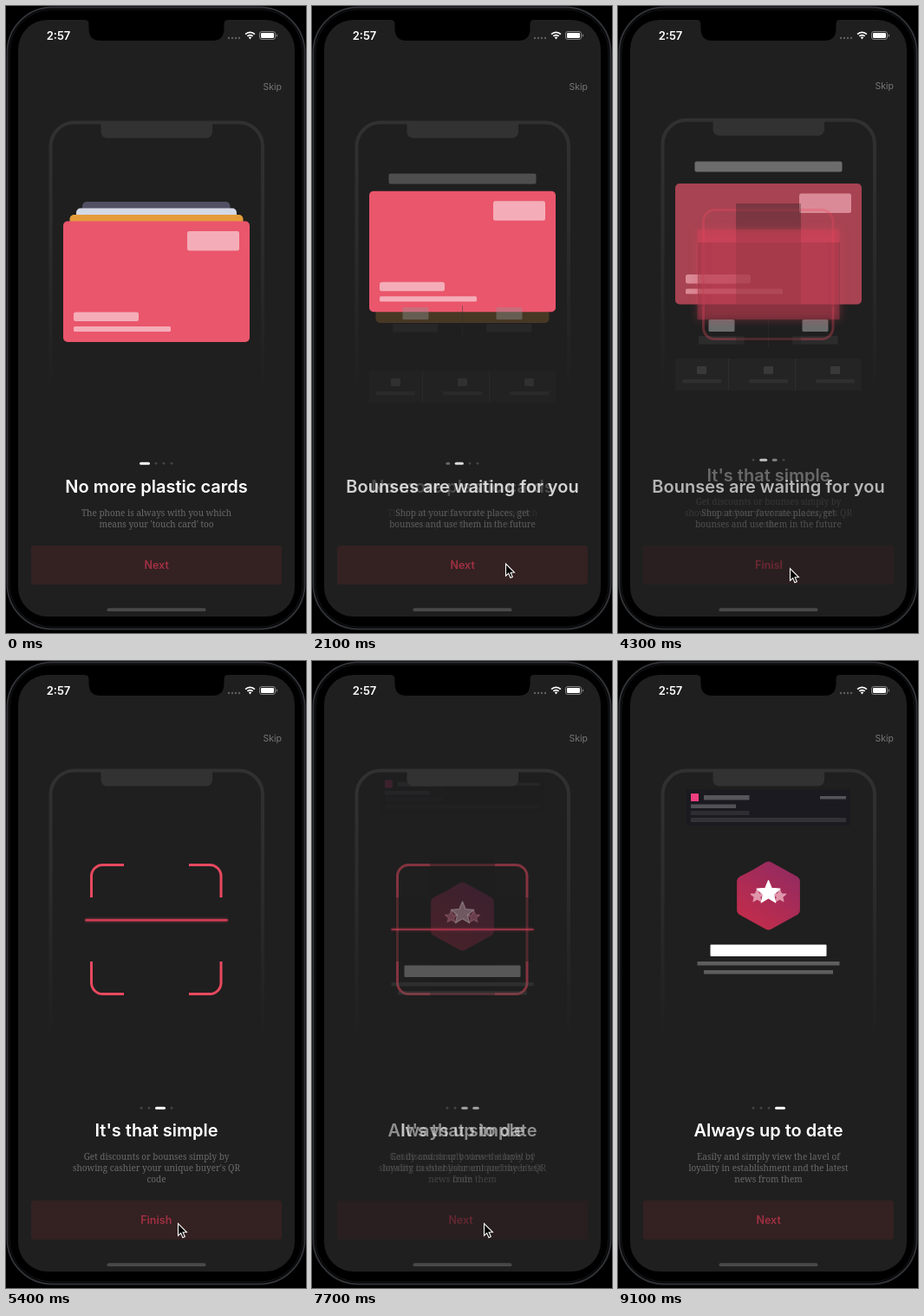
An HTML page with a canvas that plays this animation: 346 by 724 pixels, repeating every 10000 ms.

```html
<!DOCTYPE html>
<html lang="en">
<head>
<meta charset="utf-8">
<title>Onboarding</title>
<style>
html, body { margin: 0; width: 100%; height: 100%; overflow: hidden; background: #000; }
canvas { display: block; width: 346px; height: 724px; }
</style>
</head>
<body>
<canvas id="stage"></canvas>
<script>
const W = 346, H = 724, LOOP = 10000, STEP = 100, MID = 173.5;
const BG = '#1f1f1f', RED = '#ea566c', LINE = '#e8495f';
const SANS = 'Inter, "Open Sans", sans-serif';
const SERIF = '"Noto Serif", "Liberation Serif", serif';

const PAGES = [
  { title: 'No more plastic cards', y: 554.5, text: ['The phone is always with you which', "means your 'touch card' too"] },
  { title: 'Bounses are waiting for you', y: 554.5, text: ['Shop at your favorate places, get', 'bounses and use them in the future'] },
  { title: "It's that simple", y: 542, text: ['Get discounts or bounses simply by', "showing cashier your unique buyer's QR", 'code'] },
  { title: 'Always up to date', y: 542, text: ['Easily and simply view the lavel of', 'loyality in establishment and the latest', 'news from them'] }
];

const cv = document.getElementById('stage');
const dpr = window.devicePixelRatio || 1;
cv.width = W * dpr;
cv.height = H * dpr;
const c = cv.getContext('2d');

const clamp = (v, a = 0, b = 1) => Math.min(b, Math.max(a, v));
const mix = (a, b, k) => a + (b - a) * k;
const easeOut = u => 1 - (1 - u) ** 3;
const swing = u => (1 - Math.cos(Math.PI * u)) / 2;
const span = (t, a, b) => clamp((t - a) / (b - a));

function track(t, keys, ease = u => u) {
  if (t <= keys[0][0]) return keys[0][1];
  for (let i = 1; i < keys.length; i++) {
    const [t0, v0] = keys[i - 1], [t1, v1] = keys[i];
    if (t < t1) return mix(v0, v1, ease((t - t0) / (t1 - t0)));
  }
  return keys[keys.length - 1][1];
}

// Draws inside a saved state with opacity and offset.
function layer(alpha, dy, draw) {
  if (alpha <= 0.003) return;
  c.save();
  c.globalAlpha *= alpha;
  c.translate(0, dy);
  draw();
  c.restore();
}

// Box given by its edges.
function box(x0, y0, x1, y1, fill, r = 0) {
  c.beginPath();
  c.roundRect(x0, y0, x1 - x0, y1 - y0, r);
  c.fillStyle = fill;
  c.fill();
}

function label(str, x, y, font, fill, align = 'center') {
  c.font = font;
  c.textAlign = align;
  c.textBaseline = 'alphabetic';
  c.fillStyle = fill;
  c.fillText(str, x, y);
}

function disc(x, y, r, fill) {
  c.beginPath();
  c.arc(x, y, r, 0, 7);
  c.fillStyle = fill;
  c.fill();
}

function device() {
  box(0, 0, W, H, '#000');
  c.lineWidth = 2;
  c.strokeStyle = '#303236';
  c.beginPath();
  c.roundRect(1.5, 1.5, 343, 718, 52);
  c.stroke();
  c.lineWidth = 1;
  c.strokeStyle = '#17181a';
  c.beginPath();
  c.roundRect(4, 4, 338, 713, 49);
  c.stroke();
  box(14, 16, 333, 705, BG, 34);

  // Notch
  c.fillStyle = '#000';
  c.beginPath();
  c.moveTo(90, 15);
  c.lineTo(256, 15);
  c.lineTo(256, 16);
  c.quadraticCurveTo(251.5, 16, 251.5, 21);
  c.lineTo(251.5, 26);
  c.quadraticCurveTo(251.5, 40, 238, 40);
  c.lineTo(109, 40);
  c.quadraticCurveTo(95.5, 40, 95.5, 26);
  c.lineTo(95.5, 21);
  c.quadraticCurveTo(95.5, 16, 90, 16);
  c.fill();

  // Status bar
  label('2:57', 60.5, 38.6, '600 13px ' + SANS, '#fff');
  for (let i = 0; i < 4; i++) disc(257 + i * 4, 37, 1.2, '#606060');
  c.strokeStyle = '#fff';
  c.lineWidth = 1.9;
  for (const r of [4.4, 7.6]) {
    c.beginPath();
    c.arc(281.5, 38, r, -Math.PI * 0.75, -Math.PI * 0.25);
    c.stroke();
  }
  c.fillStyle = '#fff';
  c.beginPath();
  c.moveTo(281.5, 38.4);
  c.arc(281.5, 38, 2.4, -Math.PI * 0.75, -Math.PI * 0.25);
  c.fill();
  c.lineWidth = 1;
  c.strokeStyle = '#858585';
  c.beginPath();
  c.roundRect(292.5, 29.5, 18, 9, 2.5);
  c.stroke();
  box(294, 31, 309, 37, '#fff', 1.2);
  box(311.8, 32.5, 313, 35.5, '#858585', 0.6);
  box(116.5, 695.3, 230.5, 699, '#494949', 2);
}

function mockup() {
  const fade = c.createLinearGradient(0, 132, 0, 447);
  fade.addColorStop(0, '#313131');
  fade.addColorStop(0.4, '#2c2c2c');
  fade.addColorStop(1, BG);
  c.strokeStyle = fade;
  c.lineWidth = 4;
  c.beginPath();
  c.moveTo(51.5, 447);
  c.lineTo(51.5, 162);
  c.arcTo(51.5, 134.5, 79, 134.5, 27.5);
  c.lineTo(268.5, 134.5);
  c.arcTo(296, 134.5, 296, 162, 27.5);
  c.lineTo(296, 447);
  c.stroke();
  box(109.5, 134, 238, 152.5, '#323232', [0, 0, 7, 7]);
}

function backCards() {
  box(88, 226, 258.5, 337, '#514f63', 5);
  box(81, 233.5, 266, 353, '#d3d9e6', 5);
  box(73.5, 241, 273.5, 366, '#e49c3a', 5);
}

function redCard() {
  box(66, 0, 281, 139.5, RED, 5);
  box(209, 11.5, 269, 34, '#f4adb8', 2.5);
  box(78, 105, 153, 115.5, '#f4adb8', 2.5);
  box(78, 121.5, 190, 127.5, '#f4adb8', 1.5);
}

function stats() {
  for (const x of [119.5, 227.5]) {
    box(x - 15, 362, x + 15, 376, '#929292', 1.5);
    box(x - 26.5, 381, x + 26, 390.5, '#343434', 1);
  }
  box(173, 360, 174, 395, '#2d2d2d');
}

function tiles() {
  box(66, 407, 281, 444, '#272727', 1);
  for (const x of [127, 204]) box(x, 407, x + 1.2, 444, '#333');
  for (const x of [96.5, 173.5, 250.5]) {
    box(x - 5.5, 416, x + 5.5, 425, '#444', 1);
    box(x - 22.5, 431, x + 22.5, 435.5, '#353535', 1);
  }
}

function scanner(t, p) {
  c.strokeStyle = LINE;
  c.lineWidth = 3;
  c.beginPath();
  c.roundRect(98.5, 235.5, 149.5, 149, 13);
  c.stroke();
  box(136, 228, 211, 392, BG);
  box(92, 273, 256, 347, BG);
  const y = track(t, [[4650, 310], [5000, 376], [5720, 245], [6300, 310]], swing);
  const half = 1 + 76 * (1 - p);
  c.shadowColor = LINE;
  c.shadowBlur = mix(3, 14, 1 - p) * dpr;
  box(91.5, y - half, 255.5, y + half, '#dc3e5a');
}

function star(x, y, r, fill) {
  c.beginPath();
  for (let i = 0; i < 10; i++) {
    const a = -Math.PI / 2 + i * Math.PI / 5, k = i % 2 ? r * 0.45 : r;
    c.lineTo(x + k * Math.cos(a), y + k * Math.sin(a));
  }
  c.closePath();
  c.fillStyle = c.strokeStyle = fill;
  c.lineWidth = 1.2;
  c.lineJoin = 'round';
  c.fill();
  c.stroke();
}

function badge() {
  const g = c.createLinearGradient(200, 238, 150, 305);
  g.addColorStop(0, '#932b60');
  g.addColorStop(1, '#c22c4b');
  c.fillStyle = g;
  c.beginPath();
  c.moveTo(155, 241.5);
  for (let i = 0; i < 6; i++) {
    const a = -Math.PI / 2 + i * Math.PI / 3, b = a + Math.PI / 3;
    c.arcTo(MID + 42 * Math.cos(a), 271 + 40.5 * Math.sin(a), MID + 42 * Math.cos(b), 271 + 40.5 * Math.sin(b), 7);
  }
  c.closePath();
  c.fill();
  star(160.5, 271.5, 7.5, '#e096ab');
  star(186.5, 271.5, 7.5, '#e096ab');
  star(MID, 267.5, 14, '#fff');
  box(106.5, 327.5, 240.5, 341, '#fff', 1);
  box(91.5, 347, 255.5, 351.5, '#5e5e5e', 0.5);
  box(99, 357, 248, 361.5, '#5e5e5e', 0.5);
}

function notice() {
  box(79, 148, 268, 190, '#1a1a20', 2);
  box(84, 153, 93, 162, '#ee3f80', 0.5);
  box(99, 155, 151.5, 160.5, '#55555a');
  box(233, 156, 263, 159.5, '#55555a');
  box(84, 165.5, 136, 170, '#515156');
  box(84, 173, 151.5, 178, '#2d2d32');
  box(84, 181, 263, 186, '#323237');
}

function copy(page) {
  label(page.title, MID, page.y + 7, '600 20px ' + SANS, '#fff');
  page.text.forEach((s, i) => {
    label(s, MID, 601.5 - 12.6 * (page.text.length - 1 - i), '10px ' + SERIF, '#6a6a6a');
  });
}

function dots(pos, dy) {
  for (let j = 0; j < 4; j++) {
    const on = clamp(1 - Math.abs(pos - j));
    const x = 160 + 9 * j + 4 * clamp(j - pos, -1, 1);
    const w = mix(1.4, 6, on), g = Math.round(mix(68, 255, on));
    box(x - w, 526.7 - dy, x + w, 529.7 - dy, `rgb(${g},${g},${g})`, 1.5);
  }
}

function button(p3, p4) {
  const k = p3 - p4, w = mix(28, 36.5, k);
  layer(1 - 0.5 * Math.sin(Math.PI * k), 0, () => {
    box(29, 623, 318, 668, '#342122', 3);
    c.beginPath();
    c.rect(MID - w / 2 - 0.5, 630, w + 1, 30);
    c.clip();
    const word = p4 > 0 || p3 === 0 ? 'Next' : 'Finish';
    label(word, MID - w / 2, 650, '600 12.5px ' + SANS, '#a03042', 'left');
  });
}

function cursor(t) {
  if (t < 1000 || t >= 8500) return;
  const x = track(t, [[1000, 264], [1300, 223.5], [3300, 223.5], [3700, 198.5], [8000, 198.5], [8500, 292]], swing);
  const y = track(t, [[1000, 617], [1300, 644], [3300, 644], [3700, 649.5], [8000, 649.5], [8500, 640]], swing);
  c.save();
  c.translate(x, y);
  c.beginPath();
  [[0, 0], [0, 14], [3.2, 11.1], [5.4, 16.3], [7.8, 15.2], [5.6, 10.2], [9.9, 10]].forEach(p => c.lineTo(...p));
  c.closePath();
  c.fillStyle = '#000';
  c.strokeStyle = '#fff';
  c.lineWidth = 1.1;
  c.fill();
  c.stroke();
  c.restore();
}

function render(t) {
  const p2 = easeOut(span(t, 1850, 2450));
  const p3 = track(t, [[3850, 0], [4100, 0.27], [4200, 0.27], [4300, 0.33], [4500, 1]]);
  const p4 = swing(span(t, 7440, 7960));
  const lift = 8 * p3, late = 70 * (1 - p2), shown = p2 ** 4 * (1 - p3);

  c.setTransform(dpr, 0, 0, dpr, 0, 0);
  device();
  label('Skip', 318, 97 - lift / 2, '10.5px ' + SANS, '#777', 'right');

  layer(1, 0, () => {
    c.beginPath();
    c.rect(53, 128, 241, 345);
    c.clip();
    layer(span(t, 7600, 8300), -22 * (1 - easeOut(span(t, 7600, 8500))), notice);
  });
  layer(1, -lift, mockup);

  layer(1 - p2, 0, backCards);
  layer(1 - p3, mix(248.5, 205, p2), redCard);
  layer(shown, late, () => box(88.5, 179.5, 258.5, 191.5, '#929292', 2));
  layer(shown, -late, stats);
  layer(shown, late, tiles);
  layer(p3 * (1 - p4), 0, () => scanner(t, p3));
  layer(p4 ** 2, 48 * (1 - p4), badge);

  dots(p2 + p3 + p4, 12 * p3);
  [1 - p2, p2 * (1 - p3), p3 * (1 - p4), p4].forEach((a, i) => layer(a, 0, () => copy(PAGES[i])));
  button(p3, p4);
  cursor(t);
}

const start = performance.now();
function frame() {
  const t = (performance.now() - start) % LOOP;
  render(Math.floor(t / STEP) * STEP);
  requestAnimationFrame(frame);
}
frame();
</script>
</body>
</html>
```
